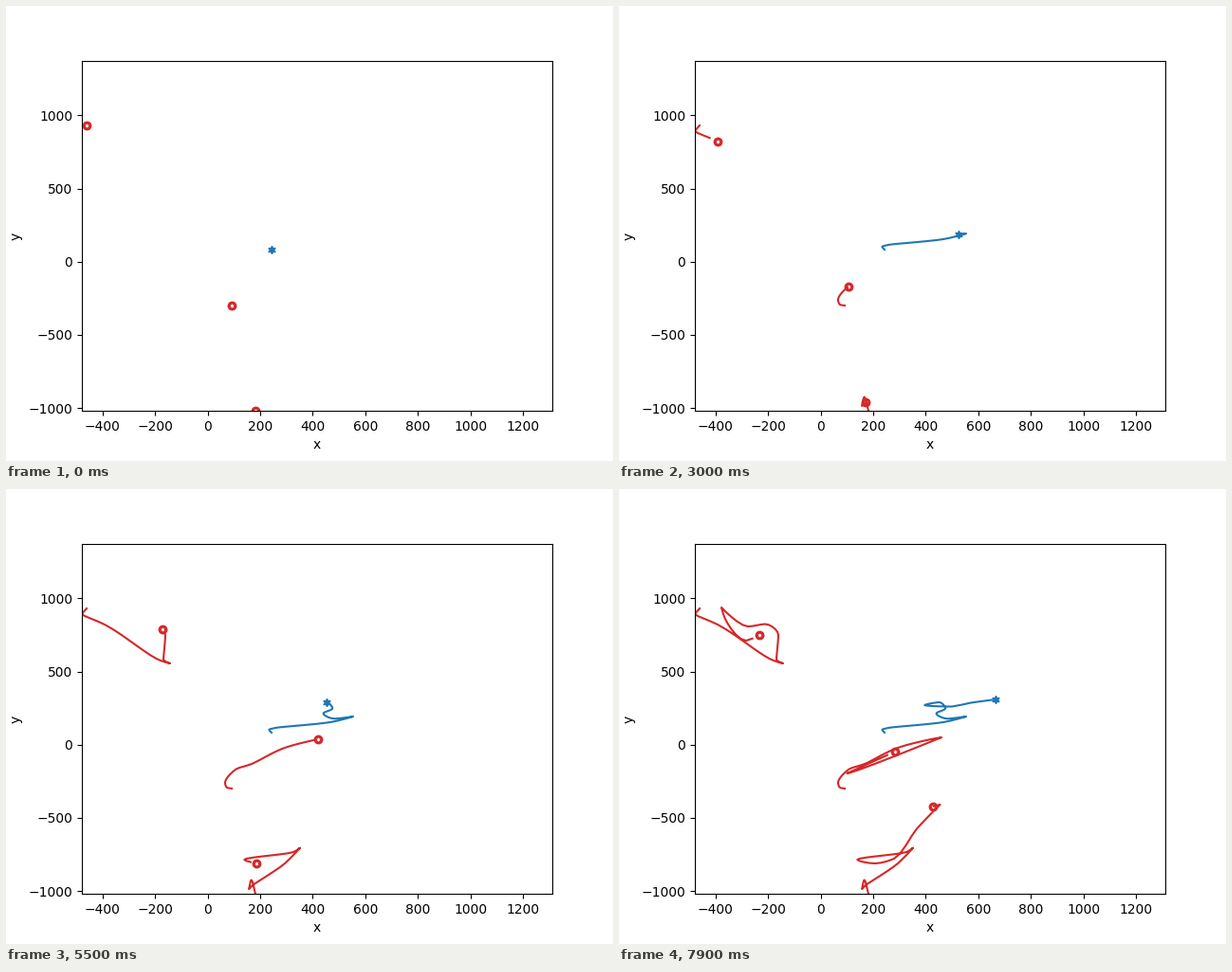
Animation of 640x480 px, one loop 8 s. Source, as a matplotlib script:

```python
import numpy as np
import matplotlib.pyplot as plt
from matplotlib.animation import FuncAnimation
from matplotlib.path import Path

FRAMES, STEP_MS = 80, 100
XLIM = (-478.5, 1311.5)
YLIM = (-1019.7, 1374.1)
LEFT, BOTTOM, WIDTH, HEIGHT = 80, 427.2, 496, 369.6  # axes box in pixels

# Turning points of each agent: frame, stage x, stage y
RUNNER = [(0, 280, 257), (8, 277.5, 254), (15, 284, 252), (23, 342, 246),
          (27, 366, 240), (33, 347, 242.3), (42, 334.6, 236.8),
          (51, 344.3, 231), (55, 338, 225), (62, 322.3, 228),
          (70, 351, 229.5), (72, 371, 225.5), (79, 397, 222)]
CHASERS = [
    [(0, 85, 126), (18, 80.5, 132), (27, 83, 134), (30, 104, 143),
     (39, 163, 181), (42, 173, 184), (47, 166, 179.5), (53, 168, 154),
     (58, 154, 142.5), (62, 136, 145), (68, 108, 125), (72, 111.5, 136),
     (77, 134, 160), (79, 148, 154)],
    [(0, 238, 316), (8, 233, 315), (15, 231, 310), (30, 242, 296),
     (39, 259, 290), (48, 294, 273), (55, 329, 264), (58, 340, 262),
     (70, 246, 298.5), (72, 240.5, 300), (79, 291, 277)],
    [(0, 263, 427), (16, 258.5, 412.5), (22, 256.2, 422), (30, 260, 418),
     (36, 294, 395), (41, 310, 378.5), (45, 303, 383), (52, 251.3, 391),
     (56, 270, 395), (59, 290, 390), (63, 313.5, 359), (71, 338.5, 333),
     (79, 331, 335)],
]


def glide(points):
    """Ease through the turning points without overshoot, one sample per frame."""
    pts = np.array(points, float)
    t, p = pts[:, 0], pts[:, 1:]
    rate = np.diff(p, axis=0) / np.diff(t)[:, None]
    a, b = rate[:-1], rate[1:]
    same = a * b > 0
    inner = np.where(same, 2 * a * b / np.where(same, a + b, 1), 0)
    slope = np.vstack([rate[:1], inner, rate[-1:]])

    k = np.arange(FRAMES)
    i = np.clip(np.searchsorted(t, k, side="right") - 1, 0, len(t) - 2)
    h = (t[i + 1] - t[i])[:, None]
    u = (k - t[i])[:, None] / h
    ease = u * u * (3 - 2 * u)
    x, y = (p[i] + ease * (p[i + 1] - p[i])
            + h * u * (1 - u) * ((1 - u) * slope[i] - u * slope[i + 1])).T
    return (XLIM[0] + (x - LEFT) / WIDTH * np.ptp(XLIM),
            YLIM[0] + (BOTTOM - y) / HEIGHT * np.ptp(YLIM))


def ring_marker():
    """Disc with a small star cut out."""
    star = Path.unit_regular_star(6, 0.55)
    hole = Path(star.vertices[::-1] * 0.46, star.codes)
    return Path.make_compound_path(Path.unit_circle(), hole)


fig, ax = plt.subplots(figsize=(6.4, 4.8), dpi=100)
ax.set(xlim=XLIM, ylim=YLIM, xlabel="x", ylabel="y")
agents = []


def add_agent(points, color, **style):
    trail, = ax.plot([], [], color=color, lw=1.5)
    head, = ax.plot([], [], color=color, ls="none", **style)
    agents.append((*glide(points), trail, head))


add_agent(RUNNER, "tab:blue", marker=(6, 1, 0), ms=6)
for points in CHASERS:
    add_agent(points, "tab:red", marker=ring_marker(), ms=7.1, mew=0)


def update(k):
    for x, y, trail, head in agents:
        trail.set_data(x[:k], y[:k])
        head.set_data(x[k:k + 1], y[k:k + 1])
    return [artist for agent in agents for artist in agent[2:]]


anim = FuncAnimation(fig, update, frames=FRAMES, interval=STEP_MS,
                     repeat=True, repeat_delay=0)
plt.show()
```
